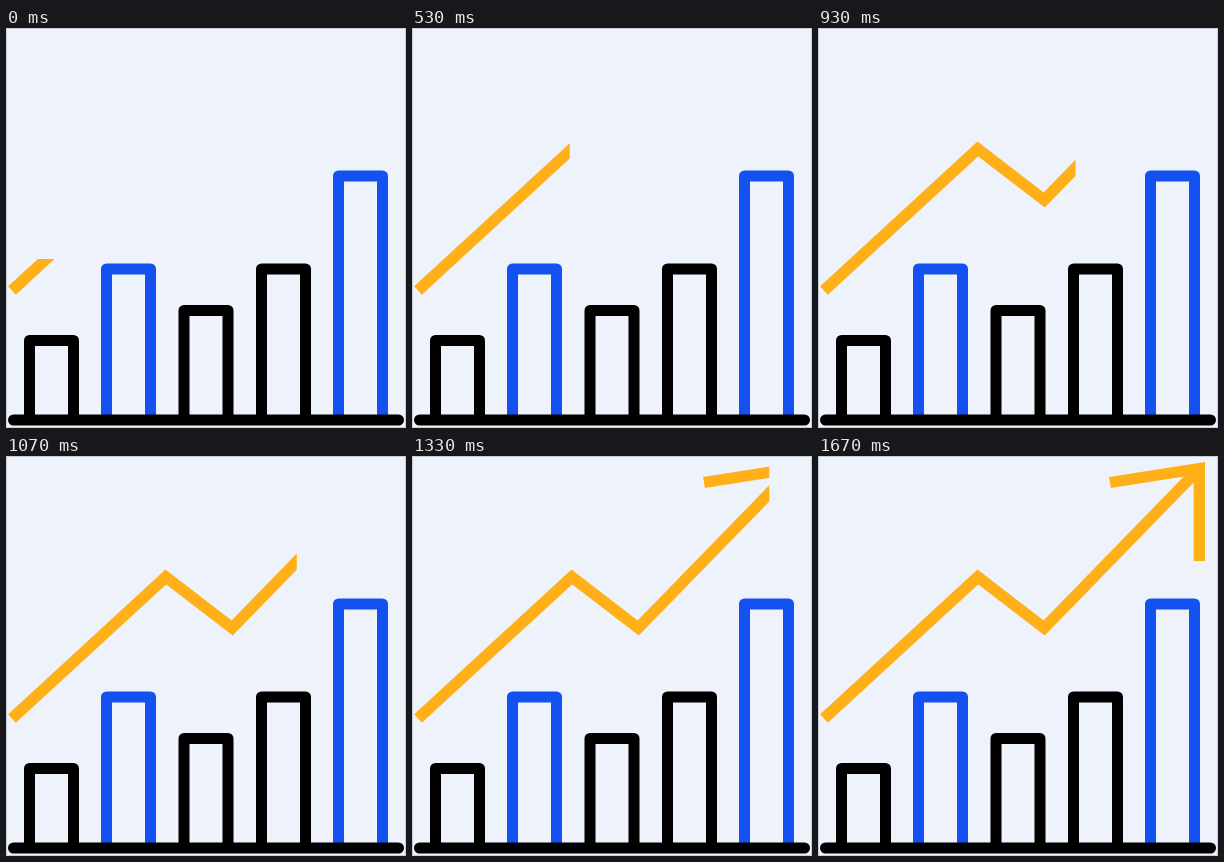
Recreate the animation shown at these times as an HTML page. Size 400 px wide and 400 px high, loop 1740 ms.

```html
<!DOCTYPE html>
<html lang="en">
<head>
<meta charset="utf-8">
<title>Growth chart</title>
<style>
  html, body { margin: 0; width: 100%; height: 100%; overflow: hidden; background: #edf2fb; }
  svg { display: block; width: 100%; height: 100%; }
  path { fill: none; stroke-width: 11; }
  .bars { stroke-linejoin: round; }
  .black { stroke: #000; }
  .blue { stroke: #1352f1; }
  .arrow { stroke: #ffb018; stroke-width: 11.3; }
</style>
</head>
<body>
<svg viewBox="0 0 400 400">
  <clipPath id="wipe"><rect id="reveal" width="48" height="400"/></clipPath>
  <rect width="400" height="400" fill="#edf2fb"/>
  <rect x=".5" y=".5" width="399" height="399" fill="none" stroke="#c9cfda"/>
  <g class="bars">
    <path class="black" d="M23.5 392V312.5H67.5V392M178 392V282.5H222V392M255.5 392V241H299.5V392"/>
    <path class="blue" d="M100.5 392V241H144.5V392M332.5 392V148H376.5V392"/>
  </g>
  <path class="black" stroke-linecap="round" d="M7.5 392H392.5"/>
  <g clip-path="url(#wipe)">
    <path class="arrow" d="M6 262.5L159.8 121L226.2 172L381.3 12.6"/>
    <path class="arrow" d="M292 26.5L381.3 12.5V105"/>
  </g>
</svg>
<script>
  const LOOP = 1740, STEPS = 26;
  const reveal = document.getElementById('reveal');
  const starts = Array.from({ length: STEPS }, (_, i) => Math.round(i * 20 / 3) * 10);
  const origin = performance.now();

  function draw() {
    const time = (performance.now() - origin) % LOOP;
    const step = starts.filter(start => start <= time).length - 1;
    // The opening pose is cut by a horizontal edge; then the wipe runs left to right.
    reveal.setAttribute('y', step === 0 ? 231 : 0);
    reveal.setAttribute('width', Math.max(48, 24.7 + 16.63 * step));
    requestAnimationFrame(draw);
  }
  draw();
</script>
</body>
</html>
```
